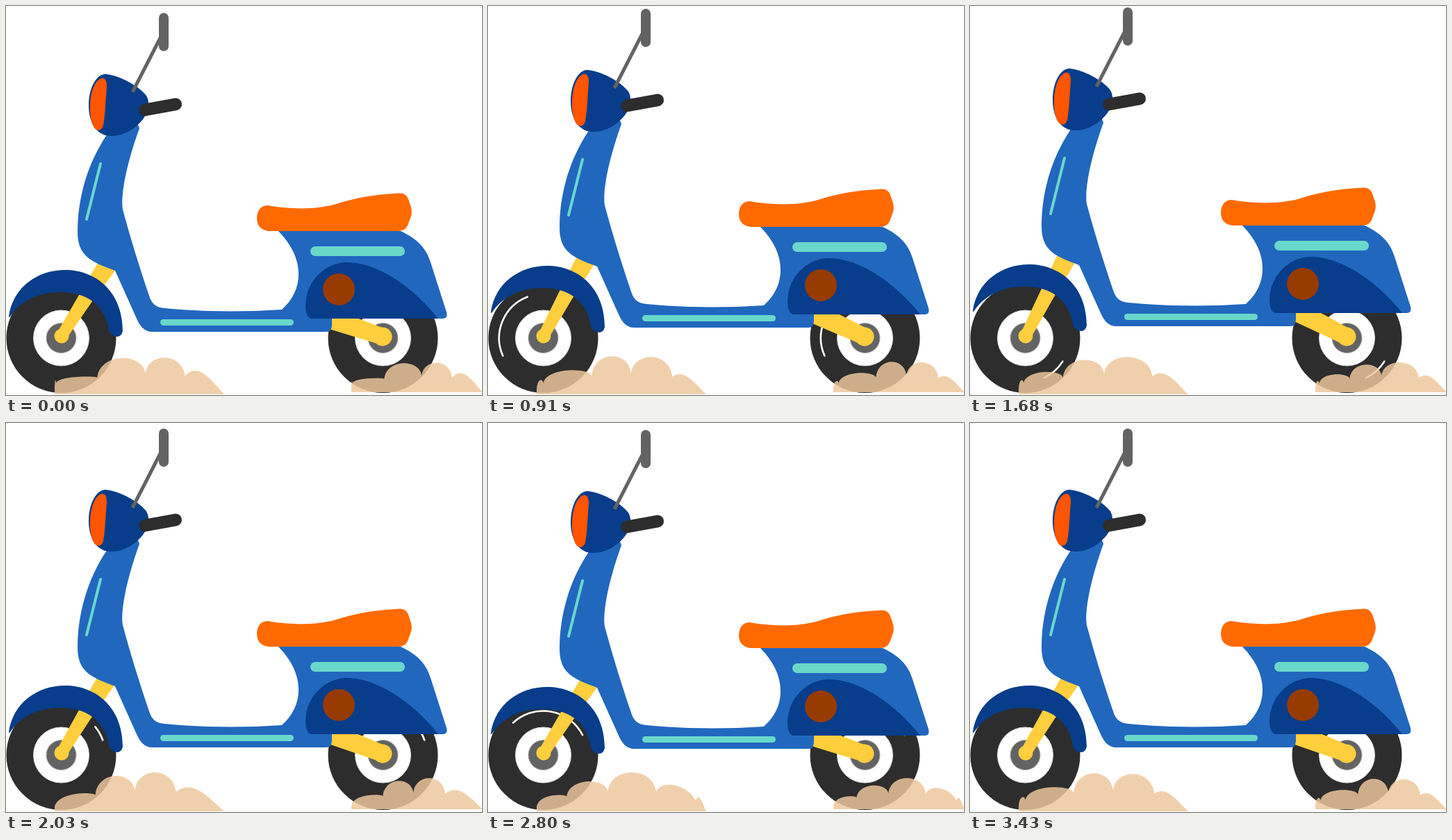
An HTML page that plays this animation: 685 px wide and 560 px high, repeating every 3.5 s.

```html
<!DOCTYPE html>
<html lang="en">
<head>
<meta charset="utf-8">
<title>Scooter</title>
<style>
html, body { margin: 0; width: 100%; height: 100%; overflow: hidden; background: #fff; }
svg { display: block; width: 100%; height: 100%; }
</style>
</head>
<body>
<svg viewBox="0 0 685 560">
  <defs>
    <g id="wheel">
      <circle r="79" fill="#2d2d2d"/>
      <circle r="40" fill="#fff" stroke="#ddd"/>
      <circle r="21.5" fill="#636363" stroke="#aaa"/>
      <path id="shine" fill="none" stroke="#fff" stroke-width="2.6" stroke-linecap="round"/>
    </g>
    <path id="dust" fill="#edc89c" fill-opacity=".84"/>
  </defs>

  <use href="#wheel" x="79.5" y="478"/>
  <use href="#wheel" x="542.5" y="478"/>

  <g id="fork" fill="#ffce3c">
    <circle r="10.5"/>
    <path d="M-8 0L-10.5 -65L-12.5 -120L-13 -138H15L14.5 -120L10.5 -65L8 0Z"/>
  </g>
  <g id="arm" fill="#ffce3c">
    <circle r="13.5"/>
    <path d="M0 -12L-82 -15V14.5L0 12Z"/>
  </g>

  <g id="body">
    <path fill="#073d8a" d="M4 447C10 405 45 380 85 380C130 380 168 412 168 468Q166 476 160 476Q152 475 148 468C145 440 125 412 79 412C45 412 22 425 8 444Q4 450 4 447Z"/>
    <path fill="#2167be" d="M146 184C118 225 103 275 103 325C103 360 122 368 157 381L188 450Q196 469 210 469H461Q469 469 469 459V450H629Q636 450 634 441L611 369C604 347 591 335 568 324H392Q421 354 421 386Q421 415 397 437Q310 443 228 435Q212 434 207 420C190 370 178 330 168 293C164 270 176 220 192 176L186 160H150Z"/>
    <path fill="#073d8a" d="M439 450Q431 448 431 430C432 395 460 369 491 369C540 370 590 410 622 450Z"/>
    <circle cx="479" cy="408" r="23" fill="#983b00"/>
    <path fill="#ff6a00" d="M376 287C410 293 445 293 472 286C505 275 535 271 566 269.500Q576 269 579 278L583 290Q585 299 582 305L578 316Q574 324 564 324H378Q361 322 361 305Q362 288 376 287Z"/>
    <g fill="#69d8cb">
      <rect x="438" y="346" width="136" height="14" rx="7"/>
      <rect x="222" y="451" width="192" height="9" rx="4.5"/>
    </g>
    <path d="M116 307L136 227" stroke="#69d8cb" stroke-width="4" stroke-linecap="round"/>
    <path fill="#073d8a" d="M143 98C163 100 190 114 202 129Q207 138 204 150C198 168 176 187 152 187C134 188 119 172 119 143C119 118 130 98 143 98Z"/>
    <path fill="#ff5400" d="M137 104Q145 102 145 116C143 140 143 155 140 172Q137 181 130 178C117 170 117 112 137 104Z"/>
    <path d="M182 124L222 46" stroke="#636363" stroke-width="5"/>
    <rect x="220" y="10" width="14" height="55" rx="7" fill="#636363"/>
    <path d="M200 149.500L244 141.500" stroke="#2d2d2d" stroke-width="18" stroke-linecap="round"/>
  </g>

  <use href="#dust"/>
  <use href="#dust" transform="translate(497 556) scale(.774 .8) translate(-70 -559)"/>
</svg>
<script>
const STEP = 70, STEPS = 50;
const LEFT = 70, END = 314, FLOOR = 559;
const CYCLE = 18, BORN = [4, 10.5, 17.5], SPEED = 10.3;
const $ = id => document.getElementById(id);
const mix = (a, b, k) => a + (b - a) * k;
const clamp = (v, lo, hi) => Math.min(hi, Math.max(lo, v));

// Puffs swell towards the middle of the cloud and shrink again at its ends.
const swell = x => Math.sin(Math.PI * clamp((x - 85) / 235, 0, 1));
const topY = x => FLOOR - 20 - 36 * swell(x);
const valleyY = x => FLOOR - (16 + 14 * swell(x)) * clamp((END - x) / 20, 0, 1);

function dustPath(t) {
  const centres = [];
  for (let n = 1; n >= -2; n--) {
    for (const b of [...BORN].reverse()) centres.push(90 + SPEED * (t % CYCLE - b - n * CYCLE));
  }
  let x = LEFT, y = FLOOR - 6, d = `M${x} ${FLOOR}V${y}`;
  centres.forEach((centre, i) => {
    const next = i + 1 < centres.length ? centres[i + 1] : 2 * END;
    const x1 = clamp((centre + next) / 2, LEFT, END), w = x1 - x;
    if (w < 1) return;
    const y1 = valleyY(x1), top = topY(centre);
    const c = (8 * top - y - y1) / 6;
    const tail = clamp(1 - (END - x1) / 25, 0, 1);
    const ax = x + w * mix(.06, .35, tail), ay = mix(c, top - 9, tail);
    const bx = x + w * mix(.94, .66, tail), by = mix(c, mix(top, FLOOR, .45), tail);
    d += `C${ax} ${ay} ${bx} ${by} ${x1} ${y1}`;
    x = x1;
    y = y1;
  });
  return d + `V${FLOOR}Z`;
}

// The glint grows from one spot, then runs round the wheel while it shortens.
function shinePath(t) {
  const [age, rise, full, life] = t < 36 ? [t, 8, 150, 35] : [t - 36, 4, 106, 12];
  if (age <= 0 || age >= life) return "";
  const late = Math.max(0, age - rise);
  const len = full * Math.min(age / rise, Math.exp(-late / (1.3 * rise)));
  const tail = 333 - 16.8 * late;
  const r = 63.5;
  const at = deg => `${r * Math.cos(deg * Math.PI / 180)} ${r * Math.sin(deg * Math.PI / 180)}`;
  return `M${at(tail - len)}A${r} ${r} 0 0 1 ${at(tail)}`;
}

function draw(ms) {
  const t = Math.floor(ms / STEP) % STEPS;
  const lift = 2 * (5 - Math.abs(t % 10 - 5));
  $("body").setAttribute("transform", `translate(0 ${-lift})`);
  $("fork").setAttribute("transform", `translate(80 475) rotate(${32.4 - .65 * lift})`);
  $("arm").setAttribute("transform", `translate(542 476) rotate(${18.8 + lift})`);
  $("shine").setAttribute("d", shinePath(t));
  $("dust").setAttribute("d", dustPath(t));
}

const start = performance.now();
function tick() {
  draw(performance.now() - start);
  requestAnimationFrame(tick);
}
tick();
</script>
</body>
</html>
```
